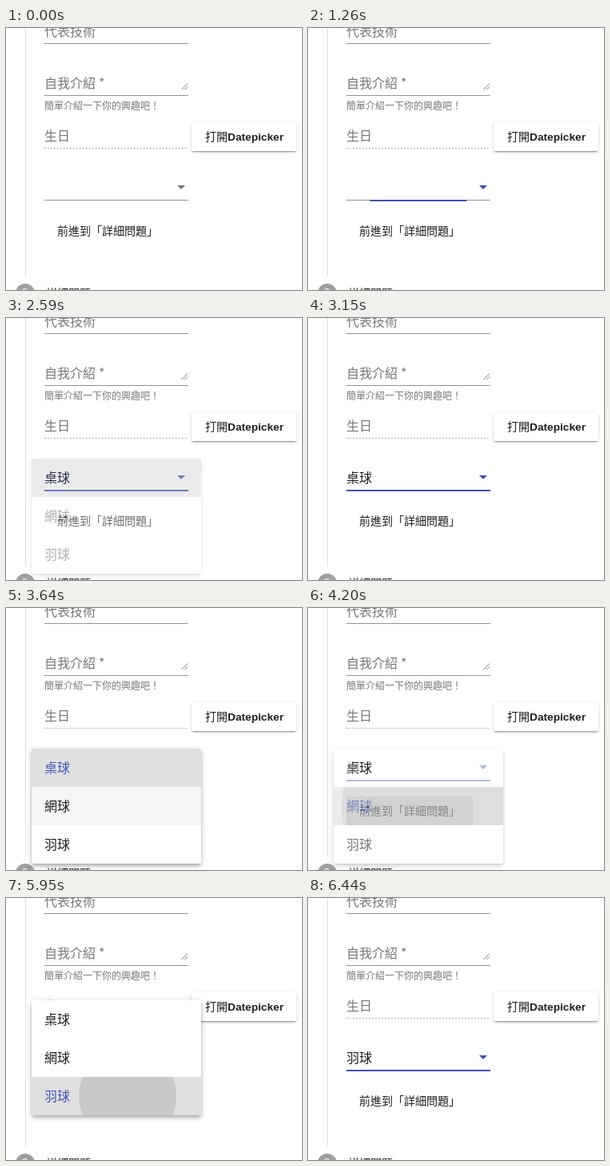
Recreate the animation shown at these times as an HTML page. Size 370x328 px, loop 6720 ms.

```html
<!DOCTYPE html>
<html lang="zh-Hant">
<head>
<meta charset="utf-8">
<title>Select field</title>
<style>
  :root { --primary: #3f51b5; --muted: #777; --ink: #1d1d1d; }
  html, body { margin: 0; width: 100%; height: 100%; overflow: hidden; background: #fff; }
  body { position: relative; font: 16px/1 "Noto Sans CJK TC", "Noto Sans CJK", sans-serif; }
  svg { position: absolute; left: 0; top: 0; }
  text { fill: var(--ink); }
  .muted text { fill: var(--muted); }
  .strong { font-size: 14px; font-weight: 500; }
  .latin { font: bold 13.7px "Liberation Sans", Arial, sans-serif; }
  .rule { stroke: #949494; }
  #raised {
    position: absolute; left: 232px; top: 118px; width: 131px; height: 36px; border-radius: 2px;
    box-shadow: 0 3px 1px -2px #0003, 0 2px 2px #00000024, 0 1px 5px #0000001f;
  }
  #panel {
    position: absolute; left: 32px; height: 144px; overflow: hidden; border-radius: 2px; background: #fff;
    box-shadow: 0 2px 4px -1px #0003, 0 4px 5px #00000024, 0 1px 10px #0000001f;
  }
  .option { position: relative; height: 48px; padding-left: 16px; line-height: 46px; overflow: hidden; color: var(--ink); }
  .option i { position: absolute; border-radius: 50%; background: #0000001a; }
</style>
</head>
<body>
<div id="raised"></div>
<svg width="370" height="328">
  <path d="M24.5 0V311" stroke="#dedede"/>
  <g class="muted">
    <text x="48" y="10">代表技術</text>
    <text x="48" y="75">自我介紹 <tspan x="116">*</tspan></text>
    <text x="48" y="102" font-size="12">簡單介紹一下你的興趣吧！</text>
    <text x="48" y="141">生日</text>
  </g>
  <path class="rule" d="M48 19.5H228M48 84.5H228M48 215.5H228"/>
  <path class="rule" d="M48 150.5H228" stroke-dasharray="1.5 2.5"/>
  <path d="M219.5 77L227 69.500M223.500 77L227 73.500" stroke="#777" fill="none"/>
  <text class="strong" x="249" y="141">打開<tspan class="latin">Datepicker</tspan></text>

  <rect id="bar" y="215" height="2" fill="var(--primary)"/>
  <path id="arrow" d="M214 197H224L219 202Z"/>
  <text id="value" x="48" y="206"></text>

  <rect id="hover" x="48" y="236" width="158" height="36" rx="2" fill="#0000001f"/>
  <text class="strong" x="64" y="259">前進到「詳細問題」</text>

  <circle cx="24" cy="332" r="12" fill="#9e9e9e"/>
  <text x="24" y="337" font-size="14" text-anchor="middle" style="fill:#fff">2</text>
  <text class="strong" x="50" y="337">詳細問題</text>
</svg>
<div id="panel"></div>
<script>
  const LOOP = 6720, STEP = 70, FOCUS = 1260;
  const names = ['桌球', '網球', '羽球'];
  // open/press/fade are times; sel is the option chosen before, pick the one clicked
  const visits = [
    { open: 1300, press: 2170, fade: 2428, sel: -1, pick: 0, over: 2170 },
    { open: 3260, press: 3990, fade: 4100, sel: 0, pick: 1, over: 3430 },
    { open: 4975, press: 5880, fade: 5990, sel: 1, pick: 2, over: 5880 }
  ];
  const el = id => document.getElementById(id);
  const clamp = x => Math.min(1, Math.max(0, x));
  const ease = x => 1 - (1 - clamp(x)) ** 3;
  const chosenAt = v => v.fade - 100;

  const panel = el('panel');
  const rows = names.map(name => {
    const row = document.createElement('div');
    row.className = 'option';
    row.textContent = name;
    const ripple = row.appendChild(document.createElement('i'));
    panel.append(row);
    return { row, ripple };
  });

  function drawPanel(t) {
    const v = visits.find(v => t >= v.open && t < v.fade + 250);
    panel.style.display = v ? 'block' : 'none';
    if (!v) return;
    const grow = ease((t - v.open) / 120);
    const shift = 48 * Math.max(0, v.sel);
    const sel = t >= chosenAt(v) ? v.pick : v.sel;
    Object.assign(panel.style, {
      top: 176 - shift + 'px',
      width: 180 + 32 * grow + 'px',
      transformOrigin: `50% ${24 + shift}px`,
      transform: `scaleY(${0.8 + 0.2 * grow})`,
      opacity: Math.min(clamp(grow * 1.12), 1 - clamp((t - v.fade) / 250))
    });
    rows.forEach(({ row, ripple }, i) => {
      const over = i === v.pick && t >= v.over;
      row.style.color = i === sel ? 'var(--primary)' : '';
      row.style.background = i === sel ? '#0000001f' : over ? '#0000000a' : '';
      const r = i === v.pick ? 125 * ease((t - v.press + 20) / 450) * (t >= v.press) : 0;
      ripple.style.cssText = `left:${120 - r}px;top:${24 - r}px;width:${2 * r}px;height:${2 * r}px`;
    });
  }

  function draw(t) {
    const focused = t >= FOCUS;
    const width = focused ? 180 * ease((t - FOCUS + 93) / 300) : 0;
    el('bar').setAttribute('x', 138 - width / 2);
    el('bar').setAttribute('width', width);
    el('arrow').style.fill = focused ? 'var(--primary)' : '#757575';
    const done = visits.filter(v => t >= chosenAt(v)).pop();
    el('value').textContent = done ? names[done.pick] : '';
    el('hover').style.display = t >= 4060 && t < 4620 ? '' : 'none';
    drawPanel(t);
  }

  const start = performance.now();
  function tick() {
    const t = (performance.now() - start) % LOOP;
    draw(Math.floor(t / STEP + 0.01) * STEP);
    requestAnimationFrame(tick);
  }
  tick();
</script>
</body>
</html>
```
